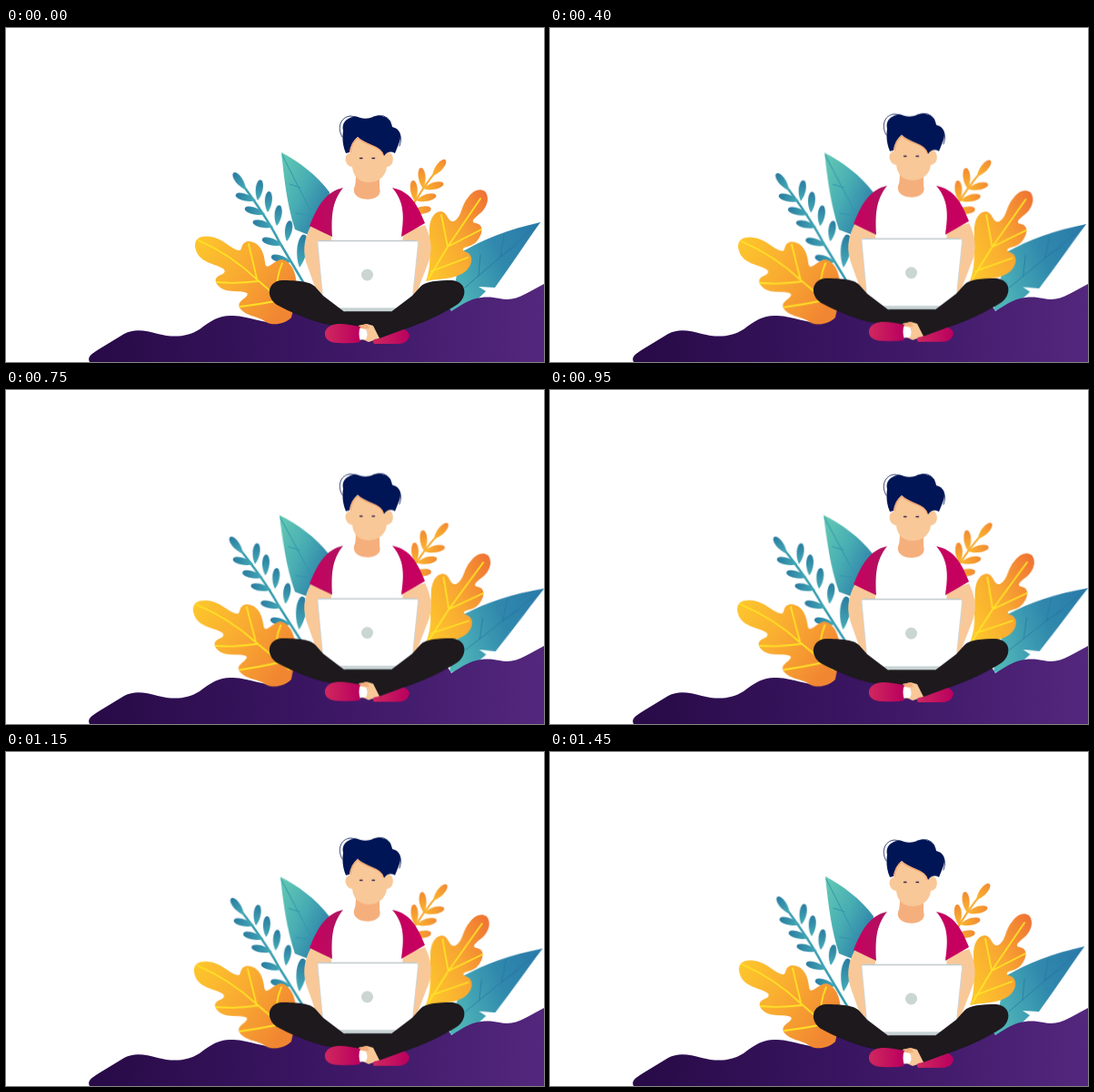
Write an HTML page without scripts that moves like this. It is 592 px wide and 368 px high and loops after 1500 ms.

```html
<!DOCTYPE html>
<html lang="en">
<head>
<meta charset="utf-8">
<title>Working outdoors</title>
<style>
  html, body { margin: 0; width: 100%; height: 100%; overflow: hidden; background: #fff; }
  svg { display: block; width: 592px; height: 368px; }

  .man, .plant { animation: 750ms cubic-bezier(.37, 0, .63, 1) -1475ms infinite alternate; }
  .man { animation-name: breathe; }
  .plant { animation-name: sway; animation-delay: -1450ms; transform-origin: var(--root); }
  @keyframes breathe { to { transform: translateY(-4.5px); } }
  @keyframes sway { to { transform: rotate(var(--lean)); } }

  .teal-leaf { --root: 335px 226px; --lean: -1.4deg; }
  .plant.fern { --root: 327px 280px; --lean: -2deg; animation-delay: -1400ms; }
  .oak-left { --root: 310px 325px; --lean: -1.5deg; }
  .twig { --root: 445px 205px; --lean: 2.6deg; }
  .blue-leaf { --root: 500px 300px; --lean: 3deg; }
  .oak-right { --root: 468px 276px; --lean: 2.1deg; }

  .line { fill: none; stroke-linecap: round; stroke-linejoin: round; }
  .vein { stroke: #ffe126; stroke-width: 1.8; }
  .skin { fill: #f9c898; }
  .navy { fill: #001555; }
  .leg { fill: #1d191c; }
</style>
</head>
<body>
<svg viewBox="0 0 592 368">
  <defs>
    <linearGradient id="soil"><stop stop-color="#270a46"/><stop offset=".5" stop-color="#3b1663"/><stop offset="1" stop-color="#53277d"/></linearGradient>
    <linearGradient id="amber" y2=".6"><stop stop-color="#fdc82c"/><stop offset=".5" stop-color="#f9ab31"/><stop offset="1" stop-color="#f18632"/></linearGradient>
    <linearGradient id="flame" x1="0" y1=".8" x2="1" y2=".1"><stop stop-color="#fdc52c"/><stop offset=".5" stop-color="#f8a632"/><stop offset="1" stop-color="#ef7434"/></linearGradient>
    <linearGradient id="mint" x2=".9" y2=".8"><stop stop-color="#65cbb3"/><stop offset=".5" stop-color="#48adb3"/><stop offset="1" stop-color="#2a7ba8"/></linearGradient>
    <linearGradient id="sea" x1="0" y1=".6" x2="1" y2=".2"><stop stop-color="#4eb4b8"/><stop offset=".55" stop-color="#3089ad"/><stop offset="1" stop-color="#2a7ba9"/></linearGradient>
    <linearGradient id="frond" x1="0" y1="0" x2="0" y2="1"><stop stop-color="#297b9f"/><stop offset="1" stop-color="#45acb8"/></linearGradient>
    <linearGradient id="bud" x1="0" y1="0" x2="0" y2="1"><stop stop-color="#f28932"/><stop offset="1" stop-color="#fbb72e"/></linearGradient>
    <linearGradient id="sleeve"><stop stop-color="#c9005f"/><stop offset="1" stop-color="#ad145f"/></linearGradient>
    <linearGradient id="shoe"><stop stop-color="#d0285f"/><stop offset="1" stop-color="#b9005e"/></linearGradient>
    <path id="drop" d="M0 0C-4-6-5.500-17-2-22Q0-24 2-22C5.500-17 4-6 0 0Z"/>
  </defs>

  <g class="plant teal-leaf">
    <path fill="url(#mint)" d="M303 137C322 147 342 162 356 181L350 236L333 228L318 222C309 194 306 165 303 137Z"/>
    <path class="line" stroke="#3295ad" d="M304 140L343 217M312 172L324 176M319 204L337 207"/>
  </g>

  <g class="plant blue-leaf">
    <path fill="url(#sea)" d="M588 214C552 222 525 233 501 247L488 312L501 310Q517 302 528 290L520 285L538 286C551 268 569 241 588 214Z"/>
    <path class="line" stroke="#2877a1" stroke-width=".8" d="M587 215L505 286M548 228L544 252M522 250L520 273M562 239L544 252"/>
  </g>

  <path fill="url(#soil)" d="M92 368C88 361 98 357 107 351L130 337C141 331 153 333 167 337C183 341 199 341 213 332C227 321 236 316 250 317C270 318 283 326 303 325L322 296H480L490 312L503 304C516 296 530 295 543 298C562 302 572 292 592 282V368Z"/>

  <g class="plant fern" fill="url(#frond)">
    <path class="line" stroke="#389cb0" stroke-width="2.500" d="M257 168Q287 208 301 236L327 280"/>
    <use href="#drop" transform="translate(264 178)rotate(-36)"/>
    <use href="#drop" transform="translate(277 190)rotate(8)"/>
    <use href="#drop" transform="translate(288 203)rotate(4)"/>
    <use href="#drop" transform="translate(298 218)rotate(7)"/>
    <use href="#drop" transform="translate(309 235)rotate(9)"/>
    <use href="#drop" transform="translate(323 264)rotate(8)scale(1.400 1.600)"/>
    <use href="#drop" transform="translate(275 190)rotate(-74)"/>
    <use href="#drop" transform="translate(285 205)rotate(-74)"/>
    <use href="#drop" transform="translate(294 219)rotate(-76)"/>
    <use href="#drop" transform="translate(304 239)rotate(-74)"/>
    <use href="#drop" transform="translate(314 258)rotate(-74)"/>
  </g>

  <g class="plant oak-left">
    <path fill="url(#amber)" d="M208 240C208 229 219 228 230 231C242 235 247 243 256 245C261 246 257 237 266 235C279 235 284 247 285 258C286 270 295 255 304 255C316 258 322 274 319 297L314 319C306 327 293 328 286 324C278 317 263 318 257 308C253 300 269 297 265 292C258 288 237 294 231 280C228 271 244 273 240 266C232 259 210 260 208 240Z"/>
    <path class="line vein" d="M212 234Q248 250 276 277L312 308M232 280Q253 282 277 279M267 238L276 276M258 307Q281 304 302 300M304 259Q296 276 299 297"/>
  </g>

  <g class="plant twig" fill="url(#bud)">
    <path class="line" stroke="#f9a930" stroke-width="2" d="M477 154Q459 173 442 206"/>
    <use href="#drop" transform="translate(469 163)rotate(39)"/>
    <use href="#drop" transform="translate(459 177)rotate(-6)"/>
    <use href="#drop" transform="translate(450 191)rotate(-5)"/>
    <use href="#drop" transform="translate(459 177)rotate(76)"/>
    <use href="#drop" transform="translate(451 190)rotate(76)"/>
    <use href="#drop" transform="translate(445 203)rotate(80)"/>
  </g>

  <g class="plant oak-right">
    <path fill="url(#flame)" d="M462 279C470 257 464 243 466 228C465 214 469 203 478 202C487 203 485 214 493 213C502 208 500 196 509 186C514 179 521 176 527 180C533 187 529 198 522 204C516 209 510 214 517 215C528 217 523 231 516 237C510 242 499 241 504 246C516 248 514 263 503 270C492 277 476 276 462 279Z"/>
    <path class="line vein" d="M522 188L486 241L465 276M479 206L486 241L523 222M468 268L508 253"/>
  </g>

  <g class="man">
    <path class="skin" d="M336 217C327 233 326 248 332 263L343 294L361 299L360 226ZM461 217C469 233 470 248 463 263L451 294L434 299L436 226Z"/>
    <path fill="#fff" d="M370 176L384 173H412L426 176C438 190 438 212 436 240H358C358 212 358 192 370 176Z"/>
    <path fill="url(#sleeve)" d="M371 176C352 180 343 196 334 218Q346 224 359 230C358 209 358 192 371 176Z"/>
    <path fill="#c5005f" d="M425 176C445 180 453 195 461 215Q449 222 435 230C438 209 439 192 425 176Z"/>
    <path fill="#f5af7d" d="M385 160H411V176C417 193 379 193 383 176Q385 174 385 160Z"/>

    <path class="skin" d="M379 122H420V137C427 136 429 152 419 153C418 164 409 170 399 170C389 170 382 164 381 153C372 152 371 138 379 138Z"/>
    <path class="navy" d="M374 138C370 129 370 120 371 113C368 102 381 95 390 99Q397 101 404 98C415 94 424 100 425 109C434 111 436 119 432 128L428 138Q421 134 416 141Q414 133 403 129Q391 124 387 120Q379 126 378 137Z"/>
    <path class="line" stroke="#f4a673" stroke-width="1.300" d="M379 137Q380 127 387 121Q391 125 403 130Q414 134 415 140"/>
    <path class="line" stroke="#001555" stroke-width=".8" d="M370 120C364 110 368 98 379 97L386 98M404 98Q417 93 423 103M431 113Q437 119 433 130"/>
    <path class="line" stroke="#33284c" stroke-width="1.400" d="M389.500 143.500H392M403 143.500H405.500"/>

    <path fill="#fff" stroke="#c7d2d6" stroke-width=".8" d="M345 234.500H451Q454 234.500 453.500 238L448 291L447 309H349L348 291L343 238Q342 234.500 345 234.500Z"/>
    <path class="line" stroke="#bfc9cc" stroke-width="1.300" d="M345 234.500H451"/>
    <circle cx="397.500" cy="272" r="6.500" fill="#cbd5d4"/>
    <path fill="#c7d2d3" d="M355 308.500H441V314H355Z"/>

    <path class="leg" d="M303 278C286 280 286 299 300 306C324 319 352 329 383 331L400 326L425 312.500H372L349 295L341 286C336 279 320 278 303 278Z"/>
    <path class="leg" d="M491 278C508 280 508 297 496 305C466 324 440 331 411 342L396 324L372 312.500H424L447 295L456 285C461 279 475 278 491 278Z"/>
    <path class="skin" d="M388 328L397 326L404 328L411 342L399 346L388 341Z"/>
    <path fill="#f2ae7c" d="M388 328L397 326L400 331L390 332Z"/>
    <path fill="#fff" d="M386 330L396 332Q399 338 396 343L386 344Z"/>
    <path fill="url(#shoe)" d="M390 329Q387 336 390 346Q381 348 366 347C354 347 350 341 351 335C354 325 367 325 378 327Z"/>
    <path fill="url(#shoe)" d="M405 343L411 342L438 332Q446 336 443 342Q440 348 430 348H405Q403 346 405 343Z"/>
  </g>
</svg>
</body>
</html>
```
